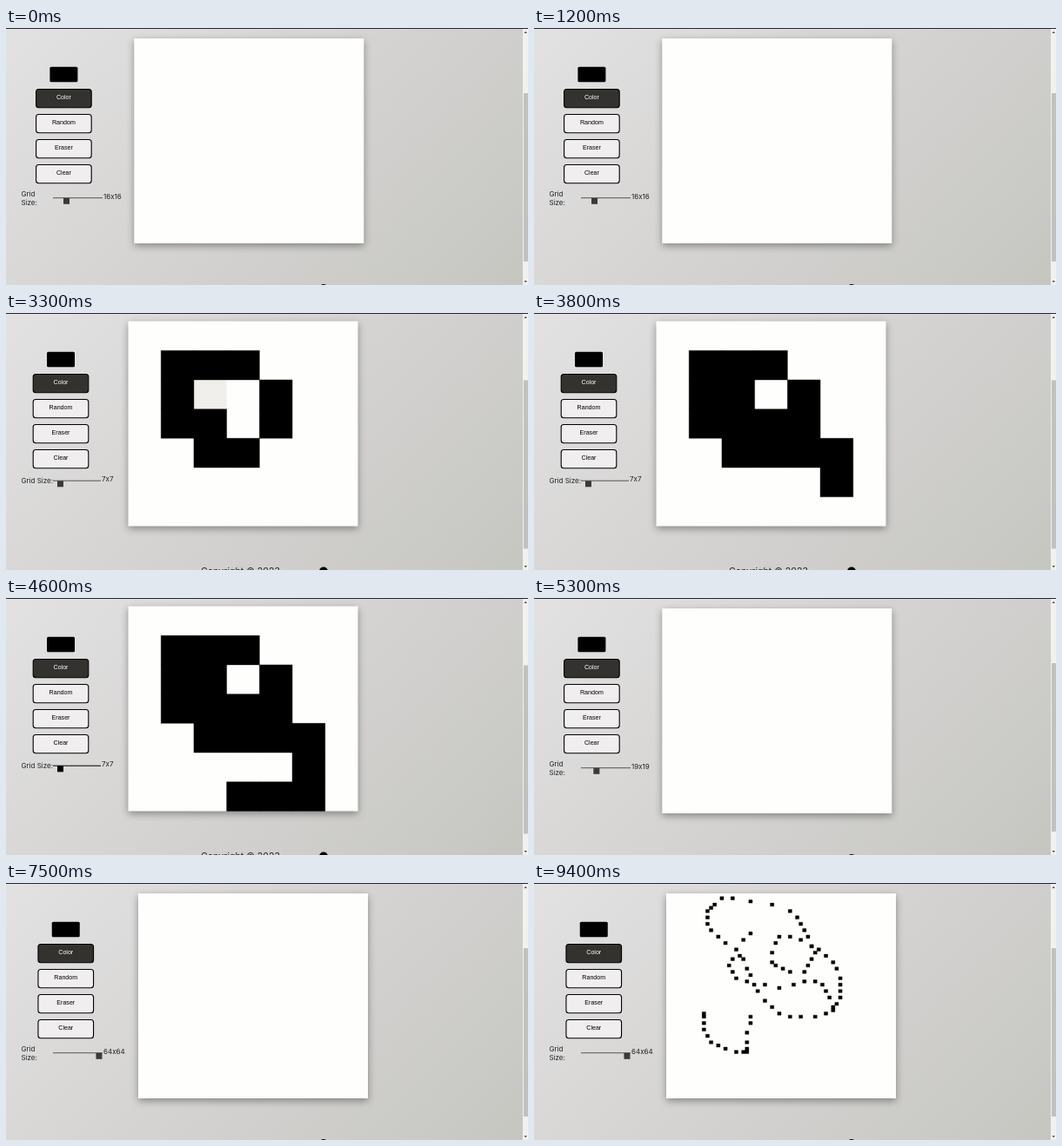
An HTML page that plays this animation: 600x296 px, repeating every 9.9 s.

```html
<!DOCTYPE html>
<html lang="en">
<head>
<meta charset="utf-8">
<title>Sketch pad</title>
<style>
  html, body { margin: 0; width: 100%; height: 100%; overflow: hidden; background: #d2d2cf; }
  svg { display: block; width: 600px; height: 296px; }
  .label { font: 8px Inter, sans-serif; fill: #222; }
  .btn { font: 7.1px "Liberation Sans", Arial, sans-serif; text-anchor: middle; }
  .foot { font: 10.6px Inter, sans-serif; fill: #222; }
  #paper { filter: drop-shadow(0 3px 4px rgba(0, 0, 0, .36)); }
  #ink { stroke: #000; stroke-width: .4; }
</style>
</head>
<body>
<svg viewBox="0 0 600 296">
  <defs>
    <linearGradient id="bg" gradientUnits="userSpaceOnUse" x1="75" y1="-75" x2="519" y2="369">
      <stop offset="0" stop-color="#e3e2e2"/>
      <stop offset=".5" stop-color="#d4d3d2"/>
      <stop offset="1" stop-color="#c6c6c1"/>
    </linearGradient>
  </defs>
  <rect width="600" height="296" fill="url(#bg)"/>
  <rect width="600" height="1" fill="#24243a"/>

  <g id="tools"></g>

  <g class="label">
    <text id="grid" x="17.5"></text>
    <text id="size" x="17.5" y="203.7">Size:</text>
    <text id="value"></text>
  </g>
  <rect id="track" height="1"/>
  <rect id="thumb" width="7" height="7"/>

  <g id="board">
    <rect id="paper" width="264" height="236" fill="#fefefc"/>
    <path id="hover" fill="#f0efeb"/>
    <path id="ink"/>
  </g>

  <g id="footer">
    <text class="foot" x="224" y="303.9">Copyright © 2023</text>
    <circle cx="365" cy="300" r="5"/>
  </g>

  <rect x="594" y="1" width="6" height="295" fill="#f1f1f0"/>
  <rect id="bar" x="595" width="5" height="194" fill="#c1c1c0"/>
  <path d="M595.5 6l1.7-2.2 1.7 2.2zM595.5 291l1.7 2.2 1.7-2.2z" fill="#505050"/>
</svg>
<script>
const LOOP = 9900, STEP = 100, W = 264, H = 236;
const $ = id => document.getElementById(id);
const set = (id, attrs) => {
  for (const k in attrs) $(id).setAttribute(k, attrs[k]);
};

// Slider: the pointer reaches it at "grab", then drags it to a new size
const drags = [
  { grab: 1900, from: 2000, to: 2500, a: 16, b: 7 },
  { grab: 4400, from: 4800, to: 5000, a: 7, b: 19 },
  { grab: 6600, from: 7200, to: 7500, a: 19, b: 64 }
];

function gridSize(t) {
  let n = drags[0].a;
  for (const d of drags) {
    if (t < d.from) break;
    const p = Math.min(1, (t - d.from + STEP) / (d.to - d.from + STEP));
    n = Math.round(d.a + (d.b - d.a) * p);
  }
  return n;
}

// Slow pen: every cell on straight lines between key cells
function line(keys) {
  return keys.flatMap(([x, y], i) => {
    if (!i) return [[x, y]];
    const [px, py] = keys[i - 1];
    const len = Math.max(Math.abs(x - px), Math.abs(y - py));
    return Array.from({ length: len }, (_, k) => {
      const p = (k + 1) / len;
      return [Math.round(px + (x - px) * p), Math.round(py + (y - py) * p)];
    });
  });
}

// Fast pen: only three samples per span of a smooth curve
function dots(keys) {
  const key = i => keys[Math.max(0, Math.min(keys.length - 1, i))];
  const spline = (a, b, c, d, p) =>
    b + p / 2 * (c - a + p * (2 * a - 5 * b + 4 * c - d + p * (3 * (b - c) + d - a)));
  return Array.from({ length: keys.length * 3 - 2 }, (_, k) => {
    const i = Math.floor(k / 3), p = k % 3 / 3;
    return [0, 1].map(axis =>
      Math.round(spline(...[-1, 0, 1, 2].map(j => key(i + j)[axis]), p)));
  });
}

// "column,row" key cells; a bar lifts the pen
function stroke(n, from, to, path, trace) {
  const cells = path.split('|').flatMap(part =>
    trace(part.trim().split(' ').map(c => c.split(',').map(Number))));
  return { n, from, cells, gap: (to - from) / (cells.length - 1) };
}

const strokes = [
  stroke(7, 2960, 3260, '2,4 3,4 4,3 4,2 3,1 1,1 1,3 2,3', line),
  stroke(7, 3300, 4070, '2,2 4,4 5,4 5,6 3,6', line),
  stroke(19, 5500, 6200, '6,4 5,5 | 5,7 | 5,9 8,12 | 10,12 11,12 11,8 8,8 8,9 | 8,11 7,12 |' +
    ' 7,14 8,15 | 10,16 11,16 | 13,16 14,16 15,15 | 15,13', line),
  stroke(64, 7900, 8350,
    '34,24 29,21 31,13 40,16 46,21 48,28 47,34 44,37 34,38 27,33 23,25 20,19', dots),
  stroke(64, 8360, 8590, '23,12 18,20 19,26 31,29 41,27 45,32', dots),
  stroke(64, 8600, 8800, '23,38 22,46 21,49 14,47 10,42 10,37', dots),
  stroke(64, 8900, 9400, '16,15 11,9 12,4 18,1 34,5 38,11 41,18 38,24', dots)
];

function buildTools() {
  const names = ['Color', 'Random', 'Eraser', 'Clear'];
  $('tools').innerHTML = '<rect x="-16" y="44.8" width="32" height="17.4" rx="1.5"/>' +
    names.map((name, i) => {
      const y = 70.5 + i * 29, on = i === 0;
      return `<rect x="-31.8" y="${y}" width="63.6" height="21.2" rx="3" stroke="#000"
        stroke-width="1.1" fill="${on ? '#33322f' : '#f0eeee'}"/>
        <text class="btn" y="${y + 11.7}" fill="${on ? '#fff' : '#000'}">${name}</text>`;
    }).join('');
}

function cellPath(n, col, row) {
  const w = W / n, h = H / n;
  return `M${col * w} ${row * h}h${w}v${h}h${-w}z`;
}

function draw(t) {
  const n = gridSize(t), small = n < 10;
  const active = drags.some(d => t >= d.grab && t < d.to);
  // A wider size label pushes the page right; a second label line pushes it down
  const shift = small ? 0 : n < 20 ? 6.8 : 11.5;
  const up = small ? 2.5 : 0;

  set('tools', { transform: `translate(${63 + shift / 2} 0)` });
  set('board', { transform: `translate(${140.5 + shift} ${12 - up})` });
  set('footer', { transform: `translate(0 ${-up})` });
  set('bar', { y: 75 + up });

  $('grid').textContent = small ? 'Grid Size:' : 'Grid';
  set('grid', { y: small ? 196.3 : 193.8 });
  set('size', { visibility: small ? 'hidden' : 'visible' });
  $('value').textContent = `${n}x${n}`;
  set('value', { x: small ? 110 : 112, y: 196.8 - up });
  set('track', { x: 54, y: 195.2 - up, width: small ? 55 : 57, fill: active ? '#000' : '#555' });
  set('thumb', { x: 66 + (n - 16) * .78, y: 195.8 - up, fill: active ? '#000' : '#3a3a3a' });

  let ink = '', hover = '';
  for (const s of strokes) {
    if (s.n !== n) continue;
    s.cells.forEach(([col, row], i) => {
      const age = t - s.from - s.gap * i;
      if (age < 0) return;
      if (small && age < 30) hover += cellPath(n, col, row);
      else ink += cellPath(n, col, row);
    });
  }
  set('ink', { d: ink });
  set('hover', { d: hover });
}

buildTools();
const start = performance.now();
function tick() {
  const t = (performance.now() - start) % LOOP;
  draw(Math.floor(t / STEP) * STEP);
  requestAnimationFrame(tick);
}
tick();
</script>
</body>
</html>
```
